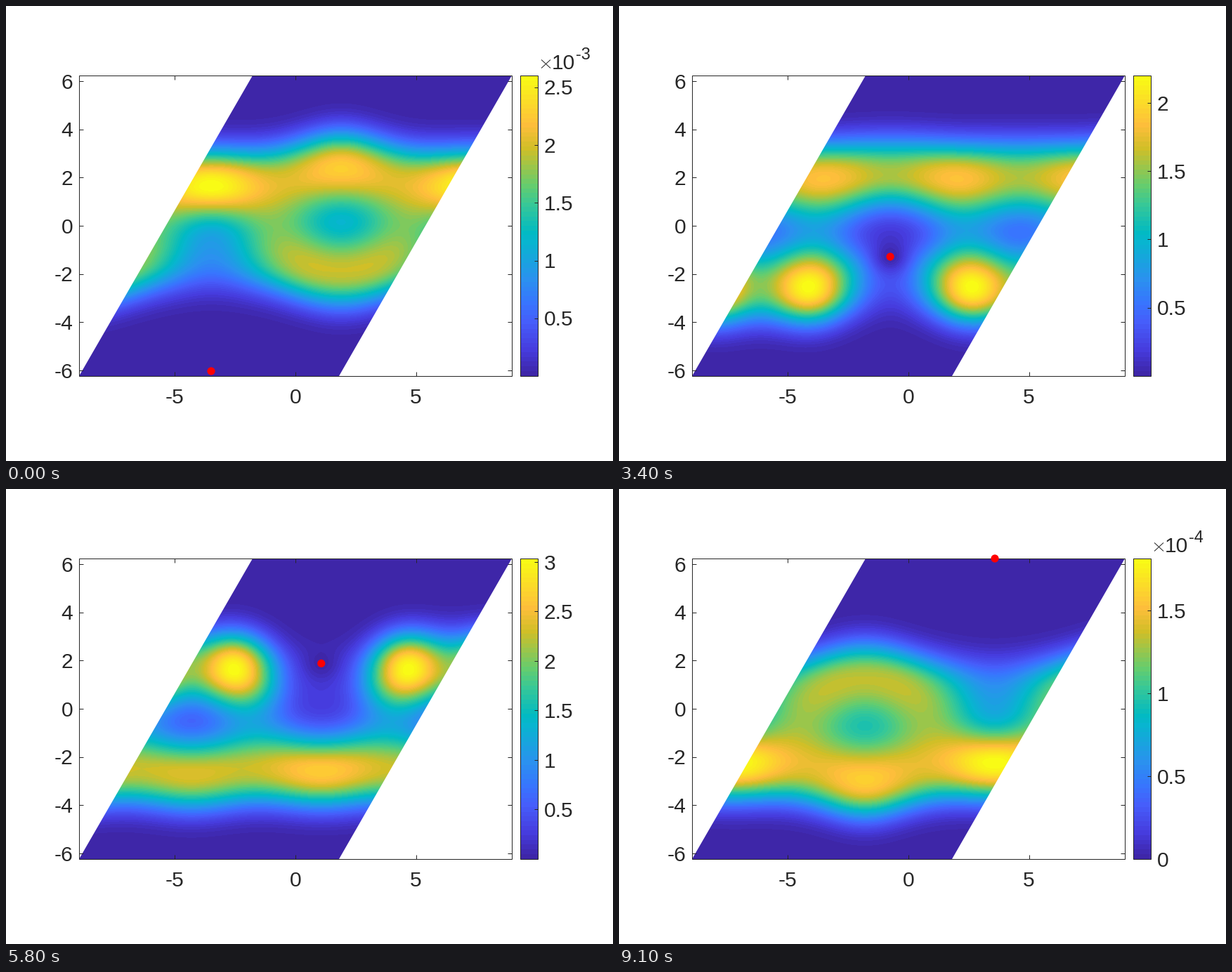
Write a matplotlib script that moves like this. It is 864 by 648 pixels and loops after 9.4 s.

```python
import numpy as np
import matplotlib.pyplot as plt
from matplotlib.animation import FuncAnimation
from matplotlib.colors import LinearSegmentedColormap
from matplotlib.patches import Circle, Polygon, Rectangle

W, H, DPI = 864, 648, 100
PT = 72 / DPI
INK = "#262626"
LEFT, RIGHT, TOP, BOTTOM = 104, 720, 99, 527
BAR_L, BAR_R = 732, 757
X0, Y0, UNIT = 411.9, 313, 34.32
PERIOD = 370 / UNIT      # horizontal period of the density
MID = -0.3               # mirror line between the two rows
STEPS = 31

plt.rcParams["font.family"] = "Liberation Sans"
plt.rcParams["axes.unicode_minus"] = False

STOPS = [(0, "#3E26A8"), (5, "#463CDE"), (11, "#465EFB"), (15, "#3875FE"),
         (20, "#2B91EF"), (28, "#08B5D0"), (30, "#02BAC3"), (36, "#37C897"),
         (40, "#64CD6F"), (48, "#D1BF27"), (53, "#FEBE3C"), (63, "#F9FB15")]
CMAP = LinearSegmentedColormap.from_list(
    "heat", [(i / 63, c) for i, c in STOPS], N=64)

# Key points of the peak density: step and value.
PEAK_K = np.array([0, 2, 5, 9, 12, 15, 20, 24, 28, 31], float)
PEAK_LOG = np.log([.002602, .03, .704, 2.962, 2.2, 1.405, 3.035, .984,
                   .0197, .0001813])


def spline(x, xs, ys):
    slope = np.gradient(ys, xs)
    i = int(np.clip(np.searchsorted(xs, x) - 1, 0, len(xs) - 2))
    h = xs[i + 1] - xs[i]
    t = (x - xs[i]) / h
    return (ys[i] * (1 + 2 * t) * (1 - t) ** 2 + ys[i + 1] * t * t * (3 - 2 * t)
            + h * slope[i] * t * (1 - t) ** 2 - h * slope[i + 1] * t * t * (1 - t))


def bump(s, center, width):
    return np.exp(-((s - center) / width) ** 2)


def row(s, v, u):
    """One row of charge; s is the dot's height on this row's side."""
    c1, c2, c3 = (np.cos(2 * np.pi * n * u / PERIOD) for n in (1, 2, 3))
    close = bump(s, 0, 1)
    amp = (0.73 - 0.14 * np.tanh(s / 2)
           + (0.06 - 0.13 * (1 + np.tanh(s / 1.2)) - 0.26 * bump(s, 2.5, 2.2)) * c1
           + (0.02 - 0.07 * np.tanh(s / 2) - 0.23 * bump(s, 0.9, 2.3)) * c2
           + 0.12 * bump(s, 2.4, 1.7) * c3)
    off = (1.66 - 0.58 * np.tanh((s - 2.2) / 2.2) + 0.18 * bump(s, 0, 1.5)
           + (0.42 * bump(s, -1, 2) - 0.36) * c1
           + (0.08 - 0.2 * bump(s, 1.7, 2)) * c2)
    inner = (1.55 + 0.007 * s * s + 0.25 * close
             - (0.006 * s * s + 0.3 * close) * c1 - 0.1 * c2)
    d = v[:, None] - off
    fall = np.where(d > 0, np.abs(d / 1.52) ** 2.4, (d / inner) ** 2)
    return amp * np.exp(-fall)


XS = (np.linspace(LEFT, RIGHT, 616) - X0) / UNIT
YS = (Y0 - np.linspace(TOP, BOTTOM, 428)) / UNIT


def dot_at(k):
    return 292 + 243 * k / STEPS, 520 - 421 * k / STEPS


def density(k):
    px, py = dot_at(k)
    u = XS - (px - X0) / UNIT
    u -= PERIOD * np.round(u / PERIOD)
    yd = (Y0 - py) / UNIT
    s, v = yd - MID, YS - MID
    g = row(s, v, u) + row(-s, -v, u)
    r2 = u ** 2 + (YS - yd)[:, None] ** 2
    g *= 1 - 0.9 * np.exp(-r2 / 0.45)
    return g / g.max()


def bar_ticks(peak):
    """Tick values, labels and the shared power of ten."""
    power = int(np.floor(np.log10(peak)))
    m = peak / 10.0 ** power
    step = 0.2 if m < 1.5 else 0.5 if m < 3.5 else 1 if m < 8 else 2
    shared = power if power < -2 else 0
    first = 0 if power < -3 else 1
    vals = np.arange(first, int(m / step) + 1) * step * 10.0 ** power
    return vals, [f"{v / 10.0 ** shared:.4g}" for v in vals], shared


fig = plt.figure(figsize=(W / DPI, H / DPI), dpi=DPI, facecolor="white")
ax = fig.add_axes([0, 0, 1, 1])
ax.axis("off")


def text(x, y, s="", ha="left", size=30):
    return ax.text(x, y, s, ha=ha, va="baseline", size=size * PT, color=INK)


def line(xs, ys):
    return ax.plot(xs, ys, color=INK, lw=PT, zorder=3,
                   solid_capstyle="butt")[0]


def box(x0, x1):
    ax.add_patch(Rectangle((x0, TOP), x1 - x0, BOTTOM - TOP, fill=False,
                           ec=INK, lw=PT, zorder=3))


def heat(data, x0, x1):
    return ax.imshow(data, cmap=CMAP, vmin=0, vmax=1, aspect="auto",
                     extent=(x0, x1, BOTTOM, TOP), interpolation="nearest")


field = heat(density(0), LEFT, RIGHT)
field.set_clip_path(Polygon(
    [(LEFT, BOTTOM), (474, BOTTOM), (RIGHT, TOP), (351, TOP)],
    transform=ax.transData))
heat(np.linspace(1, 0, 428)[:, None], BAR_L, BAR_R)
ax.set_xlim(0, W)
ax.set_ylim(H, 0)

box(LEFT, RIGHT)
box(BAR_L, BAR_R)
for n in (-5, 0, 5):
    x = X0 + n * UNIT
    line([x, x], [BOTTOM, BOTTOM - 6])
    line([x, x], [TOP, TOP + 6])
    text(x, 565.5, str(n), "center")
for n in range(-6, 7, 2):
    y = Y0 - n * UNIT
    line([LEFT, LEFT + 6], [y, y])
    line([RIGHT, RIGHT - 6], [y, y])
    text(95, y + 10.7, str(n), "right")

marks = [line([BAR_R - 5, BAR_R], [0, 0]) for _ in range(9)]
labels = [text(765.5, 0) for _ in range(9)]
factor = [line([762, 775], [76.5, 88.5]), line([762, 775], [88.5, 76.5]),
          text(777, 89.5, "10")]
expo = text(810.5, 76.5, size=23.5)
dot = ax.add_patch(Circle((0, 0), 5.6, fc="red", ec="none", zorder=4))


def draw(i):
    k = (i + 2) // 3
    field.set_data(density(k))
    dot.center = dot_at(k)
    peak = float(np.exp(spline(k, PEAK_K, PEAK_LOG)))
    vals, names, shared = bar_ticks(peak)
    for j, (mark, label) in enumerate(zip(marks, labels)):
        on = j < len(vals)
        mark.set_visible(on)
        label.set_visible(on)
        if on:
            y = BOTTOM - (BOTTOM - TOP) * vals[j] / peak
            mark.set_ydata([y, y])
            label.set_y(y + 10.7)
            label.set_text(names[j])
    for part in factor + [expo]:
        part.set_visible(shared != 0)
    expo.set_text(str(shared))
    return field, dot


anim = FuncAnimation(fig, draw, frames=94, interval=100, repeat=True,
                     repeat_delay=0, blit=False)
plt.show()
```
